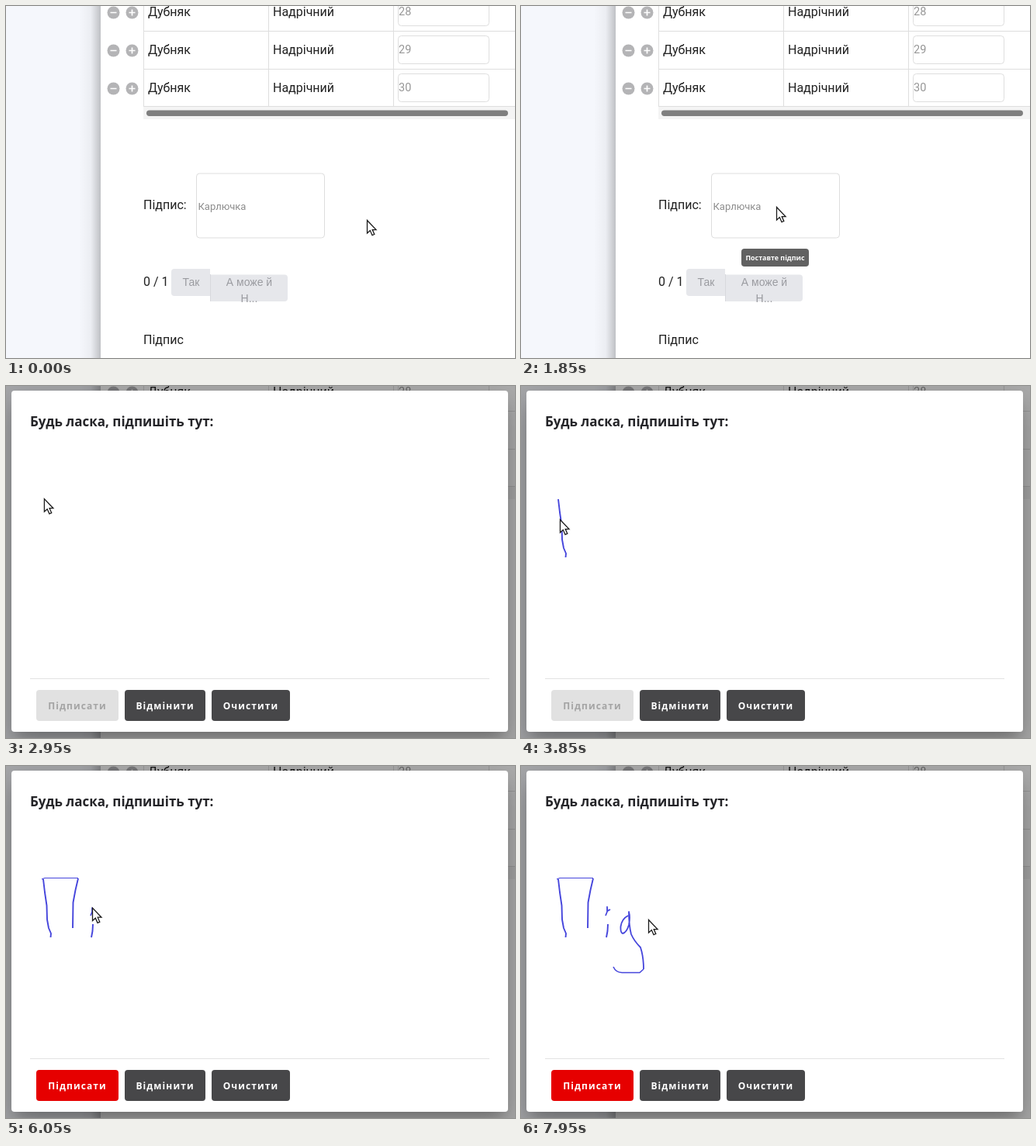
Recreate the animation shown at these times as an HTML page. Size 656x454 px, loop 8 s.

```html
<!DOCTYPE html>
<html lang="uk">
<head>
<meta charset="utf-8">
<style>
html, body { margin: 0; width: 100%; height: 100%; overflow: hidden; background: #fff; }
#stage { position: absolute; left: 0; top: 0; width: 656px; height: 454px; overflow: hidden; }
svg { position: absolute; left: 0; top: 0; overflow: visible; }
#page text { font: 16px Roboto, sans-serif; fill: #212121; }
#page text.hint { font-size: 14.5px; fill: #969696; }
#page text.small { font-size: 13px; fill: #8c8c8c; }
#page text.off { font: 14px "Liberation Sans", sans-serif; fill: #9a9ba0; text-anchor: middle; }
.line { fill: none; stroke: #dedede; }
#tip { position: absolute; left: 284px; top: 313px; width: 87px; height: 23px; border-radius: 4px;
  background: #616161; color: #fff; font: 600 8.9px/23px "Noto Sans", sans-serif; text-align: center; white-space: nowrap; }
#shade { position: absolute; inset: 0; background: rgba(0,0,0,.32); }
#dialog { position: absolute; left: 7px; top: 6px; width: 640px; height: 440px; border-radius: 4px; background: #fff;
  box-shadow: 0 11px 15px -7px rgba(0,0,0,.2), 0 24px 38px 3px rgba(0,0,0,.14), 0 9px 46px 8px rgba(0,0,0,.12); }
#dialog * { position: absolute; white-space: nowrap; }
h1 { left: 24px; top: 28px; margin: 0; font: 700 17px/24px "Noto Sans", sans-serif; color: #242428; }
hr { left: 24px; top: 371px; width: 592px; height: 1px; margin: 0; border: 0; background: #e2e2e2; }
.btn { top: 386px; height: 40px; border-radius: 4px; background: #474749; color: #fff; text-align: center;
  font: 700 12px/41px "Noto Sans", sans-serif; letter-spacing: 1.1px; }
</style>
</head>
<body>
<div id="stage">
  <svg id="page" width="656" height="454">
    <defs>
      <linearGradient id="edge">
        <stop offset="0" stop-opacity="0"/>
        <stop offset=".55" stop-opacity=".04"/>
        <stop offset="1" stop-opacity=".22"/>
      </linearGradient>
    </defs>
    <rect width="656" height="454" fill="#fff"/>
    <rect width="122" height="454" fill="#f5f7fc"/>
    <rect x="94" width="28" height="454" fill="url(#edge)"/>
    <g id="rows"></g>
    <rect x="177" y="130" width="479" height="16" fill="#f4f4f4"/>
    <path class="line" d="M177.5 0V130M338.5 0V130M499.5 0V130M177 32.5H656M177 81.5H656M177 129.5H656"/>
    <rect x="181" y="134.5" width="466" height="7.5" rx="3.7" fill="#7f7f7f"/>
    <text x="177" y="261.5">Підпис:</text>
    <rect class="line" x="245.5" y="216" width="165" height="83" rx="4"/>
    <text class="small" x="247.5" y="262.5">Карлючка</text>
    <text x="177" y="361">0 / 1</text>
    <path d="M263 339H217a4 4 0 0 0-4 4V370a4 4 0 0 0 4 4H263z" fill="#e6e7eb"/>
    <path d="M263 346.500H359a4 4 0 0 1 4 4V377a4 4 0 0 1-4 4H263z" fill="#e6e7eb"/>
    <path d="M263.500 346V381" stroke="#d8d9dd"/>
    <text class="off" x="238.500" y="361">Так</text>
    <text class="off" x="313.500" y="361">А може й</text>
    <text class="off" x="313.500" y="382">Н...</text>
    <text x="177" y="436">Підпис</text>
  </svg>
  <div id="tip">Поставте підпис</div>
  <div id="shade"></div>
  <div id="dialog">
    <h1>Будь ласка, підпишіть тут:</h1>
    <hr>
    <div class="btn" id="sign" style="left:32px;width:106px">Підписати</div>
    <div class="btn" style="left:146px;width:104px">Відмінити</div>
    <div class="btn" style="left:258px;width:101px">Очистити</div>
  </div>
  <svg width="656" height="454">
    <g id="ink" fill="none" stroke="#4545dc" stroke-linejoin="round"></g>
    <path id="cursor" d="M.5 .5V17L4.300 13.600L7 19.700L9.800 18.500L7.200 12.600H12z" fill="#fff" stroke="#1c1c1c" stroke-width="1.300"/>
  </svg>
</div>
<script>
const LOOP = 8000;
const $ = id => document.getElementById(id);

$("rows").innerHTML = [28, 29, 30].map((n, i) => {
  const y = 8 + 49 * i;
  return `<g fill="#b4b4b6"><circle cx="138.500" cy="${y + .5}" r="8"/><circle cx="162.500" cy="${y + .5}" r="8"/></g>
    <path d="M134.500 ${y + .5}h8M158.500 ${y + .5}h8m-4 -4v8" stroke="#fff" stroke-width="1.700"/>
    <text x="183" y="${y + 5}">Дубняк</text><text x="344" y="${y + 5}">Надрічний</text>
    <rect class="line" x="505.500" y="${y - 18.5}" width="117" height="36" rx="4"/>
    <text class="hint" x="506" y="${y + 4}">${n}</text>`;
}).join("");

// pen strokes: start, end, path, width
const strokes = [
  [3150, 3700, "M48 146L50 163L52.500 180L53 198L55 209L58 216L57.500 221", 1.9],
  [4180, 4400, "M46 146L50 144.500L93 144.500", 1.2],
  [4400, 4800, "M93 145L89.500 160L86.500 176L86 209", 1.9],
  [5200, 5600, "M112 204L111.500 213L110 221", 1.9],
  [5900, 6200, "M109 193L111 188L111 181.500L111.500 187L115 185", 1.7],
  [6700, 7450, "M138 193Q130 197 128.500 207Q128 215 131 216Q136 215 139 205Q141 195 139 188Q139 205 142 217Q146 226 154 234Q158 246 158 262", 1.8],
  [7450, 7750, "M158 262L153 266.500H130Q122 266 119 259", 1.5]
].map(([from, to, d, width]) => {
  const el = document.createElementNS("http://www.w3.org/2000/svg", "path");
  el.setAttribute("d", d);
  el.setAttribute("stroke-width", width);
  $("ink").append(el);
  return { from, to, el, len: el.getTotalLength() };
});

// cursor rests and travels between strokes: time, x, y
const stops = [
  [0, 465, 276], [1080, 465, 276], [1600, 329, 259], [2380, 329, 259], [2550, 218, 207],
  [2900, 49, 145], [3150, 48, 146], [3700, 57.5, 221], [3950, 46, 146], [4180, 46, 146],
  [4800, 86, 210], [4920, 130, 206], [5000, 112, 204], [5200, 112, 204],
  [5600, 110, 221], [5650, 110, 221], [5850, 109, 193], [5900, 109, 193],
  [6200, 115, 185], [6300, 118, 188], [6650, 138, 193], [6700, 138, 193],
  [7750, 119, 259], [7940, 164, 198], [8000, 164, 198]
];

const clamp = v => Math.max(0, Math.min(1, v));
const span = (t, a, b) => clamp((t - a) / (b - a));
const smooth = p => p * p * (3 - 2 * p);
const easeOut = p => 1 - (1 - p) ** 3;

function cursorAt(t) {
  const s = strokes.find(s => t >= s.from && t < s.to);
  if (s) return s.el.getPointAtLength(s.len * span(t, s.from, s.to));
  const i = stops.findIndex(k => k[0] > t);
  const [a, ax, ay] = stops[i - 1], [b, bx, by] = stops[i];
  const p = a === 2380 ? span(t, a, b) ** 2 : b === 2900 ? easeOut(span(t, a, b)) : smooth(span(t, a, b));
  return { x: ax + (bx - ax) * p, y: ay + (by - ay) * p };
}

function draw(t) {
  const tip = easeOut(span(t, 1400, 1550));
  $("tip").style.opacity = tip * (1 - span(t, 1860, 1935));
  $("tip").style.transform = `scale(${.8 + .2 * tip})`;

  $("shade").style.opacity = easeOut(span(t, 1860, 2160));
  const open = easeOut(span(t, 1860, 2010));
  $("dialog").style.opacity = span(t, 1860, 1952);
  $("dialog").style.transform = `scale(${.7 + .3 * open})`;

  const ready = t >= 4880;
  $("sign").style.background = ready ? "#e60000" : "#e1e1e1";
  $("sign").style.color = ready ? "#fff" : "#a4a4a4";

  for (const s of strokes) {
    const p = span(t, s.from, s.to);
    s.el.style.visibility = p > 0 ? "visible" : "hidden";
    s.el.style.strokeDasharray = `${s.len * p} ${s.len + 1}`;
  }
  const { x, y } = cursorAt(t);
  $("cursor").setAttribute("transform", `translate(${x} ${y})`);
}

const start = performance.now();
(function tick() {
  draw((performance.now() - start) % LOOP);
  requestAnimationFrame(tick);
})();
</script>
</body>
</html>
```
